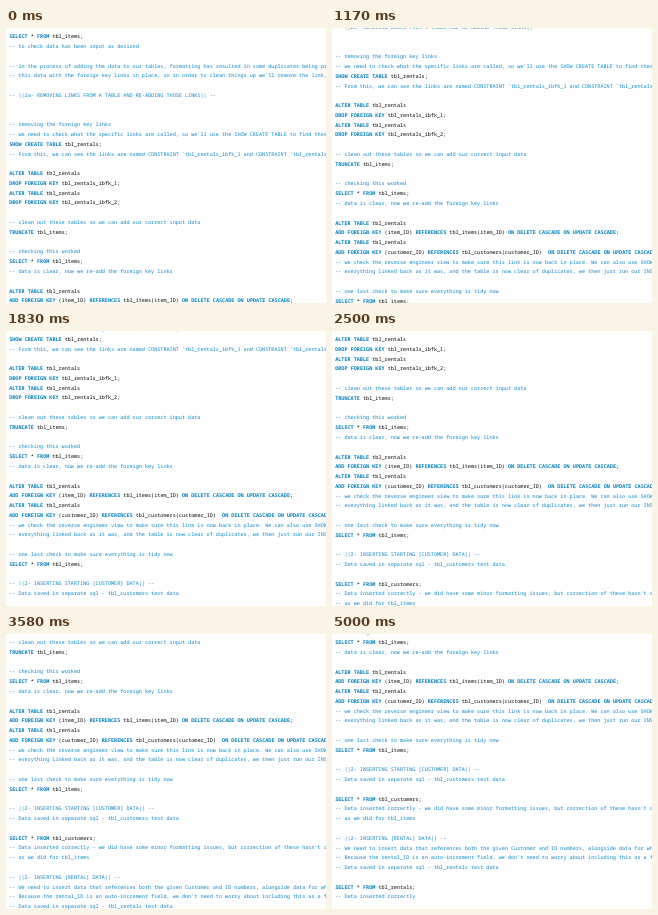
Write an HTML page that moves like this. It is 320 px wide and 275 px high and loops after 5410 ms.

```html
<!DOCTYPE html>
<html lang="en">
<head>
<meta charset="utf-8">
<title>SQL script scrolling</title>
<style>
  html, body { margin: 0; width: 100%; height: 100%; overflow: hidden; background: #fefefe; }
  #editor { position: relative; width: 100%; height: 100%; overflow: hidden; contain: strict; }
  #code {
    position: absolute; left: 3.2px; top: 4.2px; margin: 0;
    font: 5.155px/9.78px "Noto Sans Mono", "DejaVu Sans Mono", monospace;
    text-rendering: geometricPrecision;
    white-space: pre; color: #000;
  }
  b { color: #007fbf; font-weight: 700; }
  i { color: #0987cb; font-style: normal; }
</style>
</head>
<body>
<div id="editor"><pre id="code"></pre></div>
<script>
const script = `SELECT * FROM tbl_items;
-- to check data has been input as desired

-- in the process of adding the data to our tables, formatting has resulted in some duplicates being present
-- this data with the foreign key links in place, so in order to clean things up we'll remove the link, then

-- ||2a- REMOVING LINKS FROM A TABLE AND RE-ADDING THOSE LINKS|| --


-- removing the foreign key links
-- we need to check what the specific links are called, so we'll use the SHOW CREATE TABLE to find these
SHOW CREATE TABLE tbl_rentals;
-- From this, we can see the links are named CONSTRAINT \`tbl_rentals_ibfk_1 and CONSTRAINT \`tbl_rentals_ibfk_2

ALTER TABLE tbl_rentals
DROP FOREIGN KEY tbl_rentals_ibfk_1;
ALTER TABLE tbl_rentals
DROP FOREIGN KEY tbl_rentals_ibfk_2;

-- clean out these tables so we can add our correct input data
TRUNCATE tbl_items;

-- checking this worked
SELECT * FROM tbl_items;
-- data is clear, now we re-add the foreign key links

ALTER TABLE tbl_rentals
ADD FOREIGN KEY (item_ID) REFERENCES tbl_items(item_ID) ON DELETE CASCADE ON UPDATE CASCADE;
ALTER TABLE tbl_rentals
ADD FOREIGN KEY (customer_ID) REFERENCES tbl_customers(customer_ID)  ON DELETE CASCADE ON UPDATE CASCADE;
-- we check the reverse engineer view to make sure this link is now back in place. We can also use SHOW CREATE
-- everything linked back as it was, and the table is now clear of duplicates, we then just run our INSERT

-- one last check to make sure everything is tidy now
SELECT * FROM tbl_items;

-- ||2- INSERTING STARTING [CUSTOMER] DATA|| --
-- Data saved in separate sql - tbl_customers test data

SELECT * FROM tbl_customers;
-- Data inserted correctly - we did have some minor formatting issues, but correction of these hasn't changed
-- as we did for tbl_items

-- ||2- INSERTING [RENTAL] DATA|| --
-- We need to insert data that references both the given Customer and ID numbers, alongside data for which
-- Because the rental_ID is an auto-increment field, we don't need to worry about including this as a field
-- Data saved in separate sql - tbl_rentals test data

SELECT * FROM tbl_rentals;
-- Data inserted correctly`;

const LOOP = 5410, PITCH = 9.78;
// Each time (ms) moves the editor down by one line.
const steps = [170, 250, 420, 500, 670, 830, 1170, 1250, 1420, 1670, 1830, 1920,
  2000, 2420, 2580, 2830, 3000, 3080, 3580, 3670, 3750, 4330, 4500];

const keywords = /\b(SELECT|FROM|SHOW|CREATE|TABLE|ALTER|DROP|FOREIGN|KEY|TRUNCATE|ADD|REFERENCES|ON|DELETE|UPDATE|CASCADE)\b/g;
const paint = line => line.startsWith('--') ? `<i>${line}</i>` : line.replace(keywords, '<b>$1</b>');

const code = document.getElementById('code');
code.innerHTML = script.split('\n').map(paint).join('\n');

const start = performance.now();
function draw() {
  const t = (performance.now() - start) % LOOP;
  const row = steps.filter(s => s <= t).length;
  code.style.transform = `translateY(${-row * PITCH}px)`;
  requestAnimationFrame(draw);
}
draw();
</script>
</body>
</html>
```
